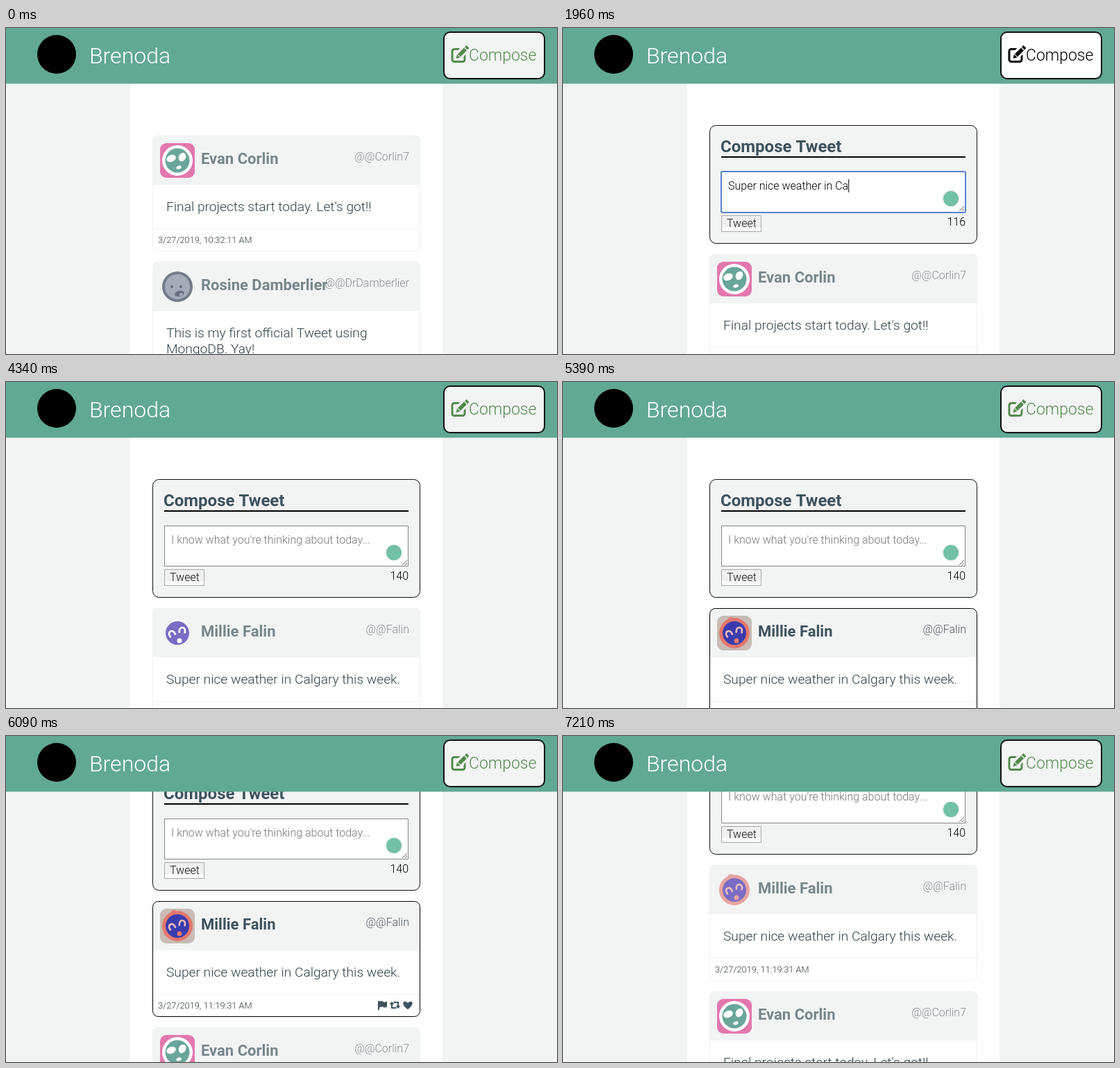
An HTML page with a canvas for the animation above (7.28 s loop, 794 by 470 pixels).

```html
<!DOCTYPE html>
<html lang="en">
<head>
<meta charset="utf-8">
<title>Compose a post</title>
<style>
  html, body { margin: 0; width: 100%; height: 100%; overflow: hidden; background: #f2f3f3; }
  canvas { display: block; }
</style>
</head>
<body>
<canvas id="stage" width="794" height="470"></canvas>
<script>
const ctx = document.getElementById('stage').getContext('2d');
const LOOP = 7280, STEP = 70;
const PAGE = '#f2f3f3', SLATE = '#3d525d', GREEN = '#538a4e';
const PANEL_HEIGHT = 171;
const MESSAGE = 'Super nice weather in Calgary this week.';

// Moments of the story, in ms
const AT = {
  buttonHover: 350, slide: 710, slideEnd: 1110, type: 1250, typeEnd: 2450,
  buttonLeave: 2520, blur: 2730, post: 2800, avatar: 3430, ring: 4410,
  cardHover: 5390, cardLeave: 6650
};
const SCROLL = [[5600, 0], [5810, 52], [5950, 52], [6090, 88], [6440, 140]];

const clamp = v => Math.max(0, Math.min(1, v));
const progress = (t, from, to) => clamp((t - from) / (to - from));
const swing = p => 0.5 - Math.cos(p * Math.PI) / 2;
const between = (t, from, to) => t >= from && t < to;

function scrollAt(t) {
  let y = 0;
  for (let i = 1; i < SCROLL.length; i++) {
    const [t0, y0] = SCROLL[i - 1], [t1, y1] = SCROLL[i];
    if (t >= t0) y = y0 + (y1 - y0) * progress(t, t0, t1);
  }
  return Math.round(y);
}

function text(str, x, y, size, color, weight = 300, align = 'left') {
  ctx.font = `${weight} ${size}px Roboto, sans-serif`;
  ctx.textAlign = align;
  ctx.fillStyle = color;
  ctx.fillText(str, x, y);
}

function rect(x, y, w, h, color) {
  ctx.fillStyle = color;
  ctx.fillRect(x, y, w, h);
}

function box(x, y, w, h, radius, fill, stroke, width = 1) {
  const inset = stroke ? width / 2 : 0;
  ctx.beginPath();
  ctx.roundRect(x + inset, y + inset, w - 2 * inset, h - 2 * inset, radius);
  if (fill) { ctx.fillStyle = fill; ctx.fill(); }
  if (stroke) { ctx.strokeStyle = stroke; ctx.lineWidth = width; ctx.stroke(); }
}

function oval(x, y, rx, ry, color, angle = 0) {
  ctx.beginPath();
  ctx.ellipse(x, y, rx, ry, angle, 0, 7);
  ctx.fillStyle = color;
  ctx.fill();
}

const disc = (x, y, r, color) => oval(x, y, r, r, color);

function line(points, color, width) {
  ctx.beginPath();
  points.forEach(([x, y]) => ctx.lineTo(x, y));
  ctx.strokeStyle = color;
  ctx.lineWidth = width;
  ctx.stroke();
}

function at(x, y, draw) {
  ctx.save();
  ctx.translate(x, y);
  draw();
  ctx.restore();
}

// Avatars are drawn around their centre
function alienFace() {
  box(-25, -25, 50, 50, 9, '#e278ad');
  disc(0, 0, 22, '#fff');
  disc(0, 0, 17.5, '#69a699');
  oval(-9, -3, 7, 5, '#fff', -0.4);
  oval(7, -5, 5, 6.5, '#fff', 0.5);
  oval(2, 10, 3.8, 2.4, '#fff', -0.3);
}

function greyFace() {
  disc(0, 0, 22, '#747b8a');
  disc(0, 0, 18, '#a6abb9');
  disc(-8, 0, 2, '#666d7e');
  disc(5, 0, 2, '#666d7e');
  oval(3, 10, 7, 4, '#666d7e', -0.2);
  oval(5, 11, 3, 1.8, '#a6abb9', -0.2);
}

function purpleFace({ t, hover }) {
  const ring = hover ? '#e4786e' : '#e7a5a0';
  const ringed = t >= AT.ring;
  if (hover) box(-25, -25, 50, 50, 9, '#c8bcb5');
  if (ringed) {
    disc(-5, -18, 5, ring);
    disc(0, 0, 22, ring);
  }
  disc(0, 0, 17, hover ? '#3a3bae' : '#7a6cc3');
  ctx.strokeStyle = hover ? '#f0bdb9' : ringed ? '#edc1c0' : '#fff';
  ctx.lineWidth = 2.6;
  for (const [x, y, turn] of [[-8, 1, -0.5], [7, -4, 0.1]]) {
    at(x, y, () => {
      ctx.rotate(turn);
      ctx.beginPath();
      ctx.moveTo(-4, 4);
      ctx.lineTo(-4, 0);
      ctx.arc(0, 0, 4, Math.PI, 0);
      ctx.lineTo(4, 4);
      ctx.stroke();
    });
  }
  disc(3, 11, 3.5, ringed ? ring : '#fff');
}

function actionIcons(y) {
  ctx.fillStyle = SLATE;
  rect(536, y - 6, 2, 13, SLATE);
  ctx.beginPath();
  ctx.moveTo(538, y - 5);
  ctx.quadraticCurveTo(541, y - 7, 544, y - 4.5);
  ctx.quadraticCurveTo(547, y - 4, 549, y - 5.5);
  ctx.lineTo(549, y + 2.5);
  ctx.quadraticCurveTo(546, y + 4.5, 543, y + 2.5);
  ctx.quadraticCurveTo(540, y + 2, 538, y + 3.5);
  ctx.fill();

  for (const side of [-1, 1]) {
    at(560.5, y, () => {
      ctx.scale(side, side);
      line([[-4.5, -2], [-4.5, 4], [2, 4]], SLATE, 2);
      ctx.beginPath();
      ctx.moveTo(-8, -1);
      ctx.lineTo(-4.5, -5);
      ctx.lineTo(-1, -1);
      ctx.fill();
    });
  }

  ctx.beginPath();
  ctx.moveTo(579, y + 6);
  ctx.bezierCurveTo(567, y - 2, 574, y - 9, 579, y - 3);
  ctx.bezierCurveTo(584, y - 9, 591, y - 2, 579, y + 6);
  ctx.fill();
}

function drawCard(card, y, state) {
  const { hover, plain } = state;
  const headHeight = plain ? 65 : 70;
  const footer = y + headHeight + 64 + (card.lines.length - 1) * 23;
  const height = footer + 33 - y;
  ctx.save();
  box(211, y, 386, height, 8, '#fff');
  ctx.clip();
  rect(211, y, 386, headHeight + 1, PAGE);
  rect(211, footer, 386, 1, '#eff1f1');
  ctx.restore();
  box(211, y, 386, height, 8, null, hover ? '#000' : '#eef0f0');

  if (!plain) at(247, y + 36, () => card.face(state));
  text(card.name, plain ? 231 : 281, y + 41, 22, hover ? SLATE : '#77868b', 700);
  text(card.handle, 581, y + 36, 16, hover ? '#4c5a62' : '#858f92', 300, 'right');
  card.lines.forEach((str, i) => text(str, 231, y + headHeight + 39 + i * 23, 19.2, '#2d3f47'));
  text(card.date, 219, footer + 21, 12.8, '#32393c');
  if (hover) actionIcons(footer + 16);
  return y + height + 15;
}

const newCard = {
  name: 'Millie Falin', handle: '@@Falin', lines: [MESSAGE],
  date: '3/27/2019, 11:19:31 AM', face: purpleFace
};
const oldCards = [
  { name: 'Evan Corlin', handle: '@@Corlin7', lines: ["Final projects start today. Let's got!!"],
    date: '3/27/2019, 10:32:11 AM', face: alienFace },
  { name: 'Rosine Damberlier', handle: '@@DrDamberlier',
    lines: ['This is my first official Tweet using', 'MongoDB. Yay!'],
    date: '3/26/2019, 10:14:52 AM', face: greyFace }
];

function drawPanel(t, top, height) {
  if (height < 2) return;
  const hidden = PANEL_HEIGHT - height;
  const y = top - Math.round(hidden * 0.9);
  const focused = between(t, AT.slide, AT.blur);
  const typed = t < AT.post
    ? MESSAGE.slice(0, Math.round(MESSAGE.length * progress(t, AT.type, AT.typeEnd))) : '';

  ctx.save();
  box(211, top, 386, height, 9, PAGE);
  ctx.clip();
  text('Compose Tweet', 227, y + 39, 24, SLATE, 700);
  rect(228, y + 45, 352, 2, '#000');

  if (focused) box(227, y + 66, 354, 61, 2, '#fff', '#5b82d2', 2);
  else box(228, y + 67, 352, 59, 0, '#fff', '#858585');
  text(typed || "I know what you're thinking about today...", 238, y + 93, 16, typed ? '#000' : '#757575');
  if (focused) rect(238 + (typed ? ctx.measureText(typed).width : 0), y + 78, 1, 19, '#000');
  line([[571, y + 124], [578, y + 117]], '#666', 1);
  line([[575, y + 124], [578, y + 121]], '#666', 1);

  box(228, y + 130, 58, 24, 0, '#f0f0f0', '#a9a9a9');
  rect(229, y + 147, 56, 6, '#fafafa');
  text('Tweet', 236, y + 147, 16, '#111');
  text(140 - typed.length, 580, y + 145, 16, '#000', 300, 'right');

  if (t < AT.slideEnd) disc(559, top + 106 - hidden * 16 / 41, 11, '#edf2f1');
  else {
    disc(559, y + 106, 12.5, '#edf4f1');
    disc(559, y + 106, 11, '#72c0a6');
  }
  ctx.restore();
  box(211, top, 386, height, 9, null, '#111');
}

function drawHeader(t) {
  rect(0, 0, 794, 80, '#61a994');
  rect(0, 80, 794, 1, '#61a99455');
  disc(73, 38, 28, '#000');
  text('Brenoda', 120, 51, 32, '#fff');

  const hover = between(t, AT.buttonHover, AT.buttonLeave);
  const ink = hover ? '#000' : GREEN;
  const fill = hover ? '#fff' : PAGE;
  box(630, 5, 147, 69, 9, fill, '#111', 2);
  box(641.5, 29, 21, 21, 3, null, ink, 3);
  line([[650, 42], [666, 26]], fill, 12);
  line([[653, 39.5], [662, 30.5]], ink, 5.5);
  line([[663, 29.5], [665.5, 27]], ink, 5.5);
  ctx.fillStyle = ink;
  ctx.beginPath();
  ctx.moveTo(648.5, 44);
  ctx.lineTo(650, 38);
  ctx.lineTo(654.5, 42.5);
  ctx.fill();
  text('Compose', 667, 47, 23, ink);
}

function draw(t) {
  const top = 140 - scrollAt(t);
  const height = Math.round(PANEL_HEIGHT * swing(progress(t, AT.slide, AT.slideEnd)));
  rect(0, 0, 794, 470, PAGE);
  rect(179, 80, 450, 390, '#fff');
  drawPanel(t, top, height);

  let y = top + height + 15;
  if (t >= AT.post) {
    const hover = between(t, AT.cardHover, AT.cardLeave);
    y = drawCard(newCard, y, { t, hover, plain: t < AT.avatar });
  }
  for (const card of oldCards) y = drawCard(card, y, { t });
  drawHeader(t);
}

const start = performance.now();
function frame() {
  const t = (performance.now() - start) % LOOP;
  draw(Math.floor(t / STEP) * STEP);
  requestAnimationFrame(frame);
}
frame();
</script>
</body>
</html>
```
